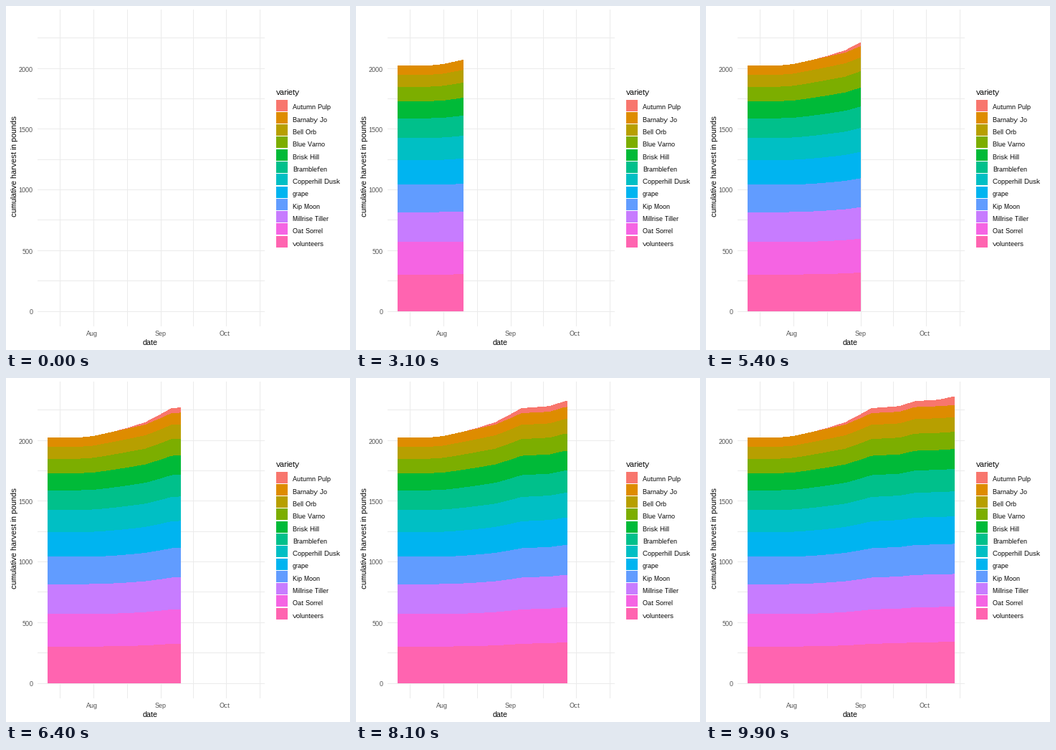
A matplotlib script for the animation above (10000 ms loop, 480 by 480 pixels).

```python
import numpy as np
import matplotlib.pyplot as plt
from matplotlib.animation import FuncAnimation
from matplotlib.patches import Polygon, Rectangle

SIZE, DPI, FRAMES = 480, 80, 100
PX = 72 / DPI                      # points per pixel
LAST_DAY = 95
LEFT, DAY, ZERO = 58.2, 3.034, 426.0
KEY_TOP, KEY_STEP = 130.6, 17.28
GRID, TICK = "#EBEBEB", "#4D4D4D"

plt.rcParams.update({"font.family": "Liberation Sans",
                     "text.hinting": "native", "text.hinting_factor": 1})

VARIETIES = [
    ("Autumn Pulp", "#F8766D"), ("Barnaby Jo", "#DE8C00"),
    ("Bell Orb", "#B79F00"), ("Blue Varno", "#7CAE00"),
    ("Brisk Hill", "#00BA38"), ("Bramblefen", "#00C08B"),
    ("Copperhill Dusk", "#00BFC4"), ("grape", "#00B4F0"),
    ("Kip Moon", "#619CFF"), ("Millrise Tiller", "#C77CFF"),
    ("Oat Sorrel", "#F564E3"), ("volunteers", "#FF64B0"),
]

# (day, pixels): growth of the stack below the top layer, then the top layer
GROWTH = [(14, 0), (21, 2), (30, 8), (45, 18), (52, 27), (57, 34),
          (70, 36), (77, 42.5), (90, 44), (95, 45.5)]
TOP_LAYER = [(30, 0), (37, 1), (57, 7), (87, 9), (95, 12)]

days = np.arange(LAST_DAY + 1)


def curve(points):
    return np.interp(days, *zip(*points))


def layer_edge(k):
    """Top of layer k; lower layers get less of the growth, early ones least."""
    start = 83.6 + 11.2 * k + 1.795 * k ** 2
    power = 1 + 0.8 * np.exp((30 - days) / 16)
    return start - curve(GROWTH) * (1 - k / 11.7) ** power


edges = [layer_edge(k) for k in range(len(VARIETIES) - 1)]
edges.insert(0, edges[0] - curve(TOP_LAYER))

# Every day falls on a whole frame; the few spare frames lie between days
day_frames = np.round(days * (FRAMES - 1) / LAST_DAY)

fig = plt.figure(figsize=(SIZE / DPI, SIZE / DPI), dpi=DPI, facecolor="white")
ax = fig.add_axes([0, 0, 1, 1])
ax.set(xlim=(0, SIZE), ylim=(SIZE, 0))
ax.axis("off")


def line(x, y):
    ax.plot(x, y, color=GRID, lw=PX, antialiased=False,
            solid_capstyle="butt", zorder=1)


def label(x, y, text, size, color="black", **kw):
    ax.text(x, y, text, fontsize=size * PX, color=color,
            va="baseline", **kw)


# Grid and axes
for k in range(10):
    y = np.floor(ZERO - 42.35 * k)
    line([44, 360], [y, y])
    if k % 2 == 0:
        label(37.5, y + 4.5, str(k * 250), 9, TICK, ha="right")
for x in (75, 122, 169, 216, 261, 307, 354):
    line([x, x], [5, 446])
for x, month in ((120.3, "Aug"), (215.3, "Sep"), (305.5, "Oct")):
    label(x, 460, month, 9, TICK, ha="center")
label(201, 473, "date", 11, ha="center")
label(15, 224, "cumulative harvest in pounds", 11, ha="center",
      rotation=90, rotation_mode="anchor")

# Legend
label(377, 124, "variety", 11)
for k, (name, color) in enumerate(VARIETIES):
    y = KEY_TOP + KEY_STEP * k
    top, bottom = round(y), round(y + 16)
    ax.add_patch(Rectangle((377, top), 16, bottom - top, fc=color, lw=0,
                           antialiased=False))
    label(400, round(y + 13.9), name, 9)

# Each layer reaches down to zero and is covered by the next one
areas = [ax.add_patch(Polygon([(LEFT, ZERO)] * 3, fc=color, lw=0,
                              antialiased=False, zorder=2 + 0.01 * k))
         for k, (_, color) in enumerate(VARIETIES)]


def update(i):
    now = np.interp(i, day_frames, days)
    d = np.append(days[days < now], now)
    x = LEFT + DAY * np.concatenate([[0], d, [now]])
    for area, edge in zip(areas, edges):
        y = np.concatenate([[ZERO], np.interp(d, days, edge), [ZERO]])
        area.set_xy(np.column_stack([x, y]))
        area.set_visible(i > 0)
    return areas


anim = FuncAnimation(fig, update, frames=FRAMES, interval=100,
                     init_func=lambda: update(0), repeat=True,
                     repeat_delay=0, blit=False)
plt.show()
```
